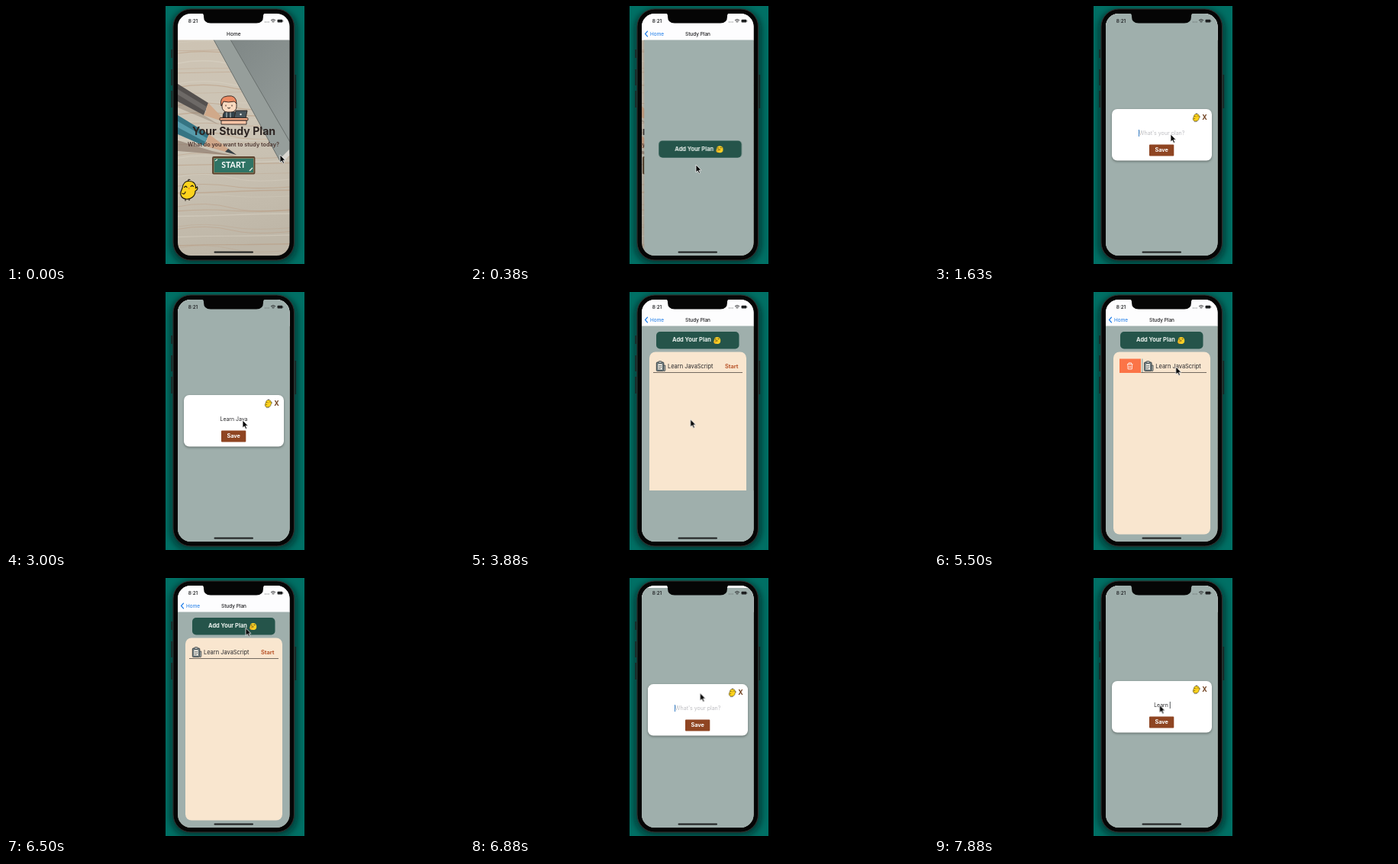
These frames come from a looping animation (600x338 px, 8000 ms). An HTML page:

```html
<!DOCTYPE html>
<html lang="en">
<head>
<meta charset="utf-8">
<title>Study planner demo</title>
<style>
html, body { margin: 0; width: 100%; height: 100%; overflow: hidden; background: #000; }
svg { display: block; width: 100%; height: 100%; }
text { font-family: Inter, "Liberation Sans", sans-serif; white-space: pre; }
.mid { text-anchor: middle; }
.medium { font-weight: 500; }
.semi { font-weight: 600; }
.bold { font-weight: 700; }
.line { fill: none; stroke: #1c1714; stroke-linecap: round; stroke-linejoin: round; }

.home, .shade, .page, .bar, .add, .list, .row, .modal, .pointer {
  animation: 8s linear infinite;
}
.home { animation-name: home; }
.shade { animation-name: shade; }
.page { animation-name: page; }
.bar { animation-name: bar; }
.add { animation-name: add; }
.list { animation-name: list; }
.row { animation-name: row; }
.modal { animation-name: modal; }
.pointer { animation-name: pointer; animation-timing-function: ease-in-out; }

@keyframes home {
  0%, 1.6% { transform: none; animation-timing-function: cubic-bezier(.2, .8, .3, 1); }
  6.3%, 100% { transform: translateX(-45px); }
}
@keyframes shade {
  0%, 1.6% { opacity: 0; }
  5%, 100% { opacity: .12; }
}
@keyframes page {
  0%, 1.6% { transform: translateX(147px); animation-timing-function: cubic-bezier(.2, .8, .3, 1); }
  6.3%, 100% { transform: none; }
}
@keyframes bar {
  0%, 1.6% { opacity: 0; }
  4.5%, 100% { opacity: 1; }
}
@keyframes add {
  0%, 45.99% { transform: translateY(124.3px); }
  46%, 100% { transform: none; }
}
@keyframes list {
  0%, 45.99% { opacity: 0; }
  46%, 100% { opacity: 1; }
}
@keyframes row {
  0%, 51.5% { transform: none; animation-timing-function: ease-out; }
  55%, 67.5% { transform: translateX(58.5px); animation-timing-function: ease-out; }
  71.5%, 100% { transform: none; }
}
@keyframes modal {
  0%, 14% { transform: translateY(330px); animation-timing-function: cubic-bezier(.2, .8, .3, 1); }
  19.4%, 45.6% { transform: none; animation-timing-function: ease-in-out; }
  50%, 82% { transform: translateY(330px); animation-timing-function: cubic-bezier(.2, .8, .3, 1); }
  87.4%, 100% { transform: none; }
}
@keyframes pointer {
  0% { transform: translate(359px, 195px); }
  1.6%, 7% { transform: translate(296px, 208px); }
  11%, 14% { transform: translate(304px, 187px); }
  17.5%, 41% { transform: translate(310px, 168px); }
  44.5%, 47% { transform: translate(300px, 188px); }
  51.5% { transform: translate(252px, 98px); }
  55% { transform: translate(304px, 98px); }
  56.2%, 63% { transform: translate(290px, 98px); }
  67% { transform: translate(334px, 98px); }
  71.5% { transform: translate(280px, 98px); }
  79%, 82.5% { transform: translate(314px, 65.5px); }
  87% { transform: translate(300px, 160px); }
  90%, 100% { transform: translate(295.5px, 166.5px); }
}
</style>
</head>
<body>
<svg viewBox="0 0 600 338" preserveAspectRatio="none">
  <defs>
    <clipPath id="screen"><rect x="225" y="10" width="146.500" height="317" rx="17"/></clipPath>
    <clipPath id="stage"><rect x="209" width="182" height="338"/></clipPath>
    <clipPath id="rowBox"><rect x="240" y="84" width="116.500" height="24"/></clipPath>
    <filter id="soft" x="-20%" y="-20%" width="140%" height="140%"><feGaussianBlur stdDeviation="5"/></filter>
    <filter id="lift" x="-10%" y="-20%" width="120%" height="150%"><feGaussianBlur stdDeviation="1.8"/></filter>
    <linearGradient id="wood" x2=".2" y2="1">
      <stop stop-color="#cdc3b3"/><stop offset=".45" stop-color="#cdc5b6"/><stop offset="1" stop-color="#beb6a7"/>
    </linearGradient>
    <linearGradient id="cover" x2=".6" y2="1">
      <stop stop-color="#7f8786"/><stop offset="1" stop-color="#929a98"/>
    </linearGradient>

    <g id="chick">
      <path d="M3 11C4 4 8 1.500 12 2C18 2 21 6 20.500 11L22.500 9.500Q24 13 20 15C20 22 14 26 8 25.500C2 25 0 20 1 16Z" fill="#fdd31c" stroke="#211c0c" stroke-width="1.200"/>
      <path class="line" d="M11 2Q10 -1 13 0M5.500 10l2-1.500 1.500 1.500M14 9l2-1.500 1.500 1.500M3 18q3 2 4-2M7 25.500v2M12 25v2" stroke-width="1.100"/>
      <path d="M10 11l3-.5-1 2.500Z" fill="#ef8a24"/>
    </g>
    <g id="face">
      <path d="M-3.800-1.500C-3-5.500 3.500-5 4.300-1C5 3.500 3 4.800 0 4.700C-3 4.800-4.600 3-4.300 1.500Z" fill="#fccf25"/>
      <path d="M-4.400 1.500L-1 .8L.5 2L-1.800 2.600L-1.500 4.500Q-4.200 4.800-4.600 2.500Z" fill="#f2b322"/>
      <path class="line" d="M-3-1.500h1.600M1-1.800h1.400M-2 .7h2.400" stroke-width=".7"/>
    </g>
  </defs>

  <rect width="600" height="338"/>
  <g clip-path="url(#stage)">
    <rect x="209" width="182" height="338" fill="#007065"/>
    <rect x="216" y="5" width="165" height="333" rx="25" fill="#00110f" opacity=".6" filter="url(#soft)"/>
  </g>
  <path d="M217.200 57v11M217.200 83v21M217.200 111v22M379.300 90v44" stroke="#1d2423" stroke-width="1.600"/>
  <rect x="219" y="4" width="158.500" height="329" rx="23" fill="#050505" stroke="#35302f" stroke-width="1"/>

  <g clip-path="url(#screen)">
    <g class="home">
      <rect x="225" y="44" width="200" height="284" fill="url(#wood)"/>
      <g id="grain" fill="none"></g>
      <path d="M272 44H372V193L360 205Z" fill="#969e9b"/>
      <path d="M294 44H372V178Z" fill="url(#cover)"/>
      <path d="M272 44L360 205M294 44L372 178" stroke="#686f6d" stroke-width="1"/>
      <path d="M359 200L371 188V196L362 205Z" fill="#d9d6d0"/>
      <path d="M225 124L259 143L280 156L225 133Z" fill="#79685a" opacity=".35"/>
      <path d="M225 102L265 127L259 143L225 125Z" fill="#54504e"/>
      <path d="M225 109L263 132L261 138L225 116Z" fill="#6d6966"/>
      <path d="M265 127L290 153L259 143Q263 139 262 135Z" fill="#d0a98a"/>
      <path d="M225 176L270 190L300 196L225 190Z" fill="#6d5447" opacity=".45"/>
      <path d="M225 143L266 168L259 183L225 168Z" fill="#357483"/>
      <path d="M225 151L263 173L261 178L225 159Z" fill="#569bab"/>
      <path d="M266 168L302 195L259 183Q265 179 263 174Z" fill="#cfa78a"/>
      <path d="M291 187L302 195L287 191Z" fill="#354148"/>

      <!-- student at a desk -->
      <g stroke="#2a211e" stroke-width=".9" stroke-linejoin="round">
        <path d="M284 146Q284 136 293 137Q302 137 302 146Z" fill="#32424b"/>
        <path d="M289 138v8M294 138v8" stroke="#d5dedb"/>
        <rect x="283" y="122" width="19" height="17" rx="7" fill="#fbd9bf"/>
        <path d="M282 131Q279 119 290 118Q302 116 302 128L299 125Q291 127 285 125Z" fill="#ec8b63"/>
        <path d="M301 137h15l-2 10h-15Z" fill="#47545b"/>
        <rect x="280" y="146.500" width="37" height="3.500" rx="1" fill="#f3a884"/>
        <path d="M282 150h33v5h-33Z" fill="#f7c3a5"/>
      </g>
      <path class="line" d="M288 130v1M296 130v1M290.500 133.500q1.500 1.500 3 0" stroke-width="1"/>
      <circle cx="307.500" cy="142" r="1.200" fill="#e8eceb"/>

      <text class="mid bold" x="298.500" y="169.300" font-size="14.100" fill="#2c2422">Your Study Plan</text>
      <text class="mid semi" x="298" y="184.300" font-size="7.300" fill="#4d3630">What do you want to study today?</text>

      <rect x="271" y="198" width="54.500" height="21.500" rx="1" fill="#2f7465" stroke="#59402c" stroke-width="1.800"/>
      <rect x="272.300" y="199.300" width="52" height="19" fill="none" stroke="#b28a60" stroke-width=".6"/>
      <path d="M274 203l3-2M319 216l4-4" stroke="#f0efe5" stroke-width="1.300"/>
      <text class="mid bold" x="298" y="212.300" font-size="10.500" fill="#fff" style="font-family:Lato,sans-serif">START</text>
      <use href="#chick" x="228" y="227.500"/>
    </g>
    <rect class="shade" x="225" y="44" width="147" height="284"/>

    <rect x="225" y="9" width="147" height="35.500" fill="#fdfdfe"/>
    <text class="mid medium" x="298.300" y="38.700" font-size="6.500" fill="#1b1b1d">Home</text>

    <g class="page">
      <rect x="225" y="44" width="147" height="284" fill="#9fafac"/>
      <g class="add">
        <rect x="244" y="52" width="108.500" height="22.500" rx="5" fill="#25544a"/>
        <text class="bold" x="265" y="65.300" font-size="7.450" fill="#e9f0ec">Add Your Plan</text>
        <use href="#face" x="323.800" y="63.200"/>
      </g>
      <g class="list">
        <rect x="235" y="78.500" width="127" height="239" rx="8" fill="#f9e6cf"/>
        <g clip-path="url(#rowBox)">
          <rect x="243" y="87.500" width="28" height="18.500" fill="#fb7447"/>
          <rect x="272.500" y="87.500" width="28.500" height="18.500" fill="#518a99"/>
          <g fill="none" stroke="#fff" stroke-width=".8">
            <path d="M253 94.500h7.500M255 94.200v-1.400h3.500v1.400M253.700 95l.4 6h5.200l.4-6M255.700 96.500v3M257.700 96.500v3"/>
            <path d="M283.500 93h4l2.500 2.500v5.500h-6.500ZM285 96h3M285 98h3M287 93v2.700h3"/>
          </g>
          <g class="row">
            <rect x="242" y="85" width="120" height="21" fill="#f9e6cf"/>
            <path d="M240 105.500H358" stroke="#514943" stroke-width=".8"/>
            <g stroke="#34383c" stroke-width=".9">
              <rect x="244.300" y="92" width="9.500" height="11.500" rx="1" fill="#788b90"/>
              <rect x="246" y="94" width="6" height="8" fill="#f3f1e8" stroke-width=".4"/>
              <rect x="246.800" y="90.800" width="4.500" height="2.500" rx=".8" fill="#c2c8c7"/>
              <path d="M247 96.500h4M247 98.500h4M247 100.500h3" stroke-width=".6"/>
              <path d="M253.800 96h2v6.500l-1 1.500-1-1.500Z" fill="#a9b3b1" stroke-width=".7"/>
            </g>
            <text x="259" y="100.400" font-size="7.450" fill="#27272a">Learn JavaScript</text>
            <text class="bold" x="334" y="100.300" font-size="7.300" fill="#ba582d">Start</text>
          </g>
        </g>
      </g>
    </g>

    <g class="bar">
      <rect x="225" y="9" width="147" height="35.500" fill="#fdfdfe"/>
      <path d="M232.500 33.200l-3 3.300 3 3.300" fill="none" stroke="#1477e8" stroke-width="1.200" stroke-linecap="round"/>
      <text x="236" y="38.800" font-size="6.450" fill="#1477e8">Home</text>
      <text class="mid medium" x="298.500" y="38.700" font-size="6.450" fill="#1b1b1d">Study Plan</text>
    </g>

    <g class="modal">
      <rect x="225" y="9" width="147" height="320" fill="#9fafac"/>
      <rect x="233" y="136" width="131" height="68" rx="7" fill="#303a38" opacity=".5" filter="url(#lift)"/>
      <rect x="233" y="135" width="131" height="67.500" rx="7" fill="#fff"/>
      <use href="#chick" transform="translate(339 140.600) scale(.41)"/>
      <text class="mid bold" x="354.400" y="149.300" font-size="8.800" fill="#70401f">X</text>
      <text class="mid" id="hint" x="298.500" y="169" font-size="7.050" fill="#bdbdc1">What's your plan?</text>
      <text class="mid" id="field" x="298.500" y="169" font-size="6.900" fill="#28282a"></text>
      <rect id="caret" y="162" width="1" height="9"/>
      <rect x="282" y="181.500" width="32.300" height="15" rx="1" fill="#8f4522"/>
      <text class="mid bold" x="298.200" y="191.400" font-size="7.300" fill="#fff">Save</text>
    </g>

    <text class="semi" x="238.800" y="21.900" font-size="6.200" fill="#202224">8:21</text>
    <path d="M339 21h1M341.300 21h1M343.600 21h1" stroke="#5d6262"/>
    <path d="M347 18.800q3-2.600 6 0M348.300 20.300q1.700-1.400 3.400 0M349.600 21.500h.8" fill="none" stroke="#1d1f20" stroke-width=".9"/>
    <rect x="355.500" y="17.800" width="6.800" height="3.700" rx="1" fill="#1d1f20"/>
    <path d="M362.900 19v1.400" stroke="#1d1f20" stroke-width=".6"/>
    <rect x="272.500" y="321.500" width="51.500" height="2" rx="1" fill="#1b1d1d"/>
  </g>
  <path d="M256 9Q259 10 259 13V14Q259 22.500 268 22.500H328Q337 22.500 337 14V13Q337 10 340 9Z" fill="#050505"/>

  <path class="pointer" d="M0 0V10L2.300 7.900L3.900 11.400L5.600 10.600L4 7.200H7Z" fill="#050505" stroke="#f4f4f4" stroke-width=".8"/>
</svg>
<script>
const LOOP = 8000;
const PLAN = "Learn JavaScript";
const [grain, hint, field, caret] = ["grain", "hint", "field", "caret"].map(id => document.getElementById(id));

// Wood grain: gently waving lines
for (let i = 0; i < 34; i++) {
  const y = 48 + i * 8.5 + 3 * Math.sin(i * 2.3);
  const bend = 4 * Math.sin(i * 1.7);
  const path = document.createElementNS("http://www.w3.org/2000/svg", "path");
  path.setAttribute("d", `M225 ${y}q36 ${bend - 4} 73 ${-bend / 2}t127 ${bend / 2 - 4}`);
  path.setAttribute("stroke", i % 3 ? "#b8977c" : "#dcd5c8");
  path.setAttribute("stroke-width", 0.5 + (i % 4) * 0.3);
  path.setAttribute("opacity", 0.5);
  grain.append(path);
}

// The first plan is typed in full, the second is begun before the loop ends
function typedCount(t) {
  return Math.floor(t < 4000 ? (t - 1900) / 108 : (t - 7230) / 105);
}

const start = performance.now();
function draw(now) {
  const t = Math.max(0, now - start) % LOOP;
  const text = PLAN.slice(0, Math.max(0, typedCount(t)));
  if (field.textContent !== text) field.textContent = text;
  hint.style.opacity = text ? 0 : 1;
  caret.setAttribute("x", text ? 298.5 + field.getComputedTextLength() / 2 : 268);
  caret.setAttribute("fill", text ? "#55585c" : "#3b82c8");
  caret.style.opacity = (t + 500) % 1000 < 500 ? 1 : 0;
  requestAnimationFrame(draw);
}
draw(start);
</script>
</body>
</html>
```
